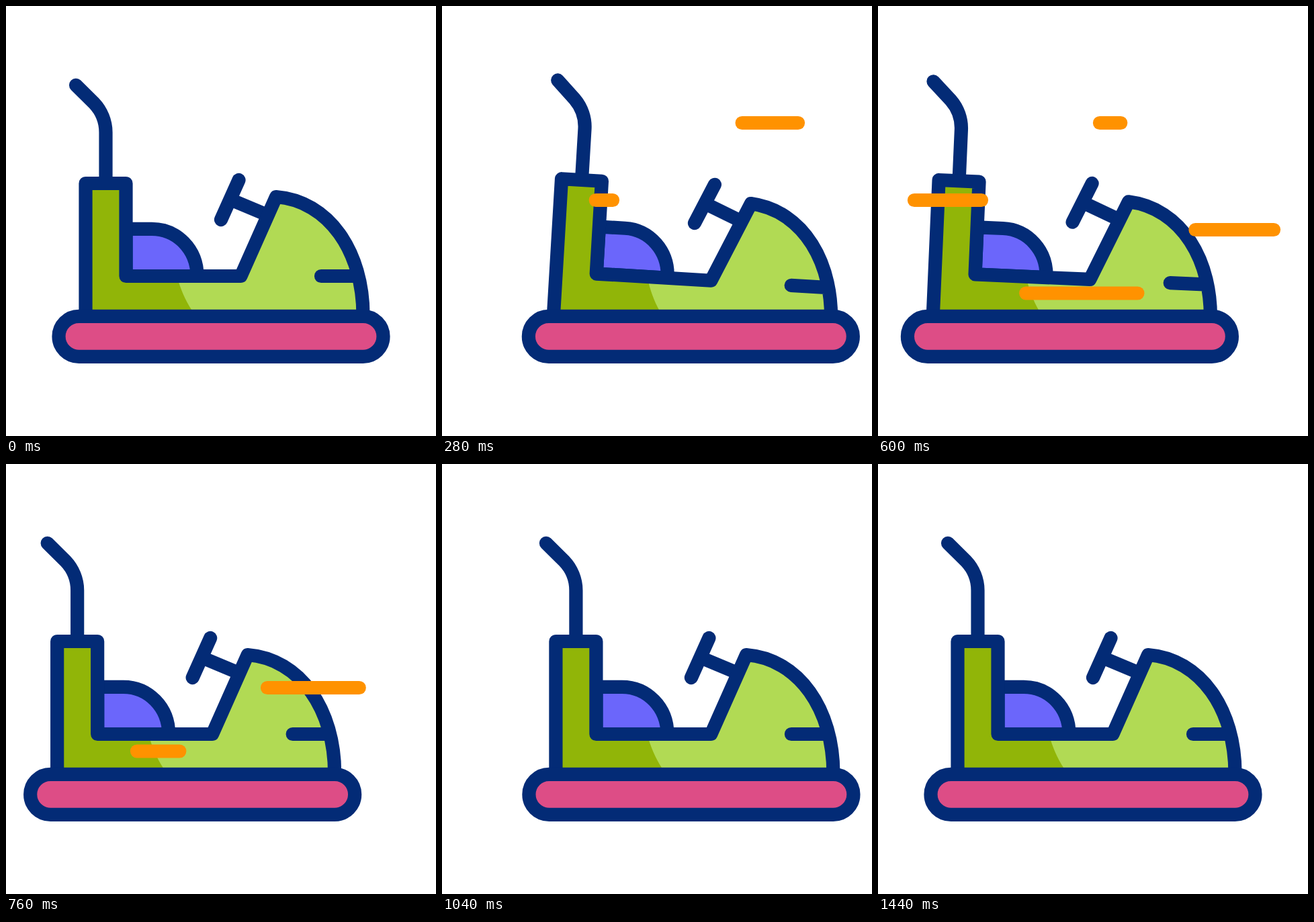
Animation, 640 px wide and 640 px high, one loop 2 s. Source, as an HTML page:

```html
<!DOCTYPE html>
<html lang="en">
<head>
<meta charset="utf-8">
<title>Bumper car</title>
<style>
  html, body { margin: 0; height: 100%; overflow: hidden; background: #fff; }
  svg { display: block; width: 100%; height: 100%; }
  #car { stroke: #032b76; }
  #streaks { stroke: #ff9200; }
</style>
</head>
<body>
<svg viewBox="0 0 640 640" fill="none" stroke-width="20.2" stroke-linecap="round" stroke-linejoin="round">
  <g id="car">
    <g id="body">
      <path d="M104 117.8 131 144.5C142 156 148.5 172 148.5 188V264"/>
      <path d="M346.5 259 320 318M335 288.5 390 311.5"/>
      <path fill="#6b66fb" d="M178.5 331.8H217C254 331.8 284.5 362 284.5 402H178.5Z"/>
      <path fill="#b1da54" stroke="none" d="M118.5 490V264H178.5V402H349.5L402 284C480 290 532 365 531.5 462V490Z"/>
      <path fill="#91b508" stroke="none" d="M118.5 490V264H178.5V402H254.5C259 420 267 438 276 452L300 490Z"/>
      <path d="M118.5 490V264H178.5V402H349.5L402 284C480 290 532 365 531.5 462V490M469 402H520"/>
    </g>
    <rect x="78.5" y="461.8" width="483" height="60" rx="30" fill="#dd4d86"/>
  </g>
  <g id="streaks"></g>
</svg>
<script>
const LOOP = 2000, END = 1440, STEP = 40, STREAK = 200;
const car = document.getElementById('car');
const body = document.getElementById('body');

// [time, value] keys, eased in and out between neighbours
const shift = [[0, 0], [333, 54], [690, -51.3], [1080, 54], [END, 0]];
const tilt = [[136, 0], [400, 6], [760, 0]];

const ease = u => {
  u = Math.min(1, Math.max(0, u));
  return u * u * (3 - 2 * u);
};

function valueAt(keys, t) {
  let value = keys[0][1];
  for (let i = 1; i < keys.length; i++) {
    const [t0, v0] = keys[i - 1], [t1, v1] = keys[i];
    value += (v1 - v0) * ease((t - t0) / (t1 - t0));
  }
  return value;
}

// right end, height, start delay
const streaks = [[530, 174, 0], [254, 289, 80], [589, 333, 280], [395, 427.5, 200]]
  .map(([x, y, delay]) => {
    const path = document.createElementNS('http://www.w3.org/2000/svg', 'path');
    document.getElementById('streaks').append(path);
    return { path, x, y, delay };
  });

function draw(t) {
  car.setAttribute('transform', `translate(${valueAt(shift, t)})`);
  body.setAttribute('transform', `rotate(${valueAt(tilt, t)} 237 415)`);
  for (const { path, x, y, delay } of streaks) {
    const head = ease((t - delay - 120) / 360);
    const tail = ease((t - delay - 360) / 320);
    path.setAttribute('d', head > tail ? `M${x - STREAK * tail} ${y}H${x - STREAK * head}` : '');
  }
}

const start = performance.now();
function tick() {
  const t = (performance.now() - start) % LOOP;
  draw(Math.min(END, Math.floor(t / STEP) * STEP));
  requestAnimationFrame(tick);
}
tick();
</script>
</body>
</html>
```
